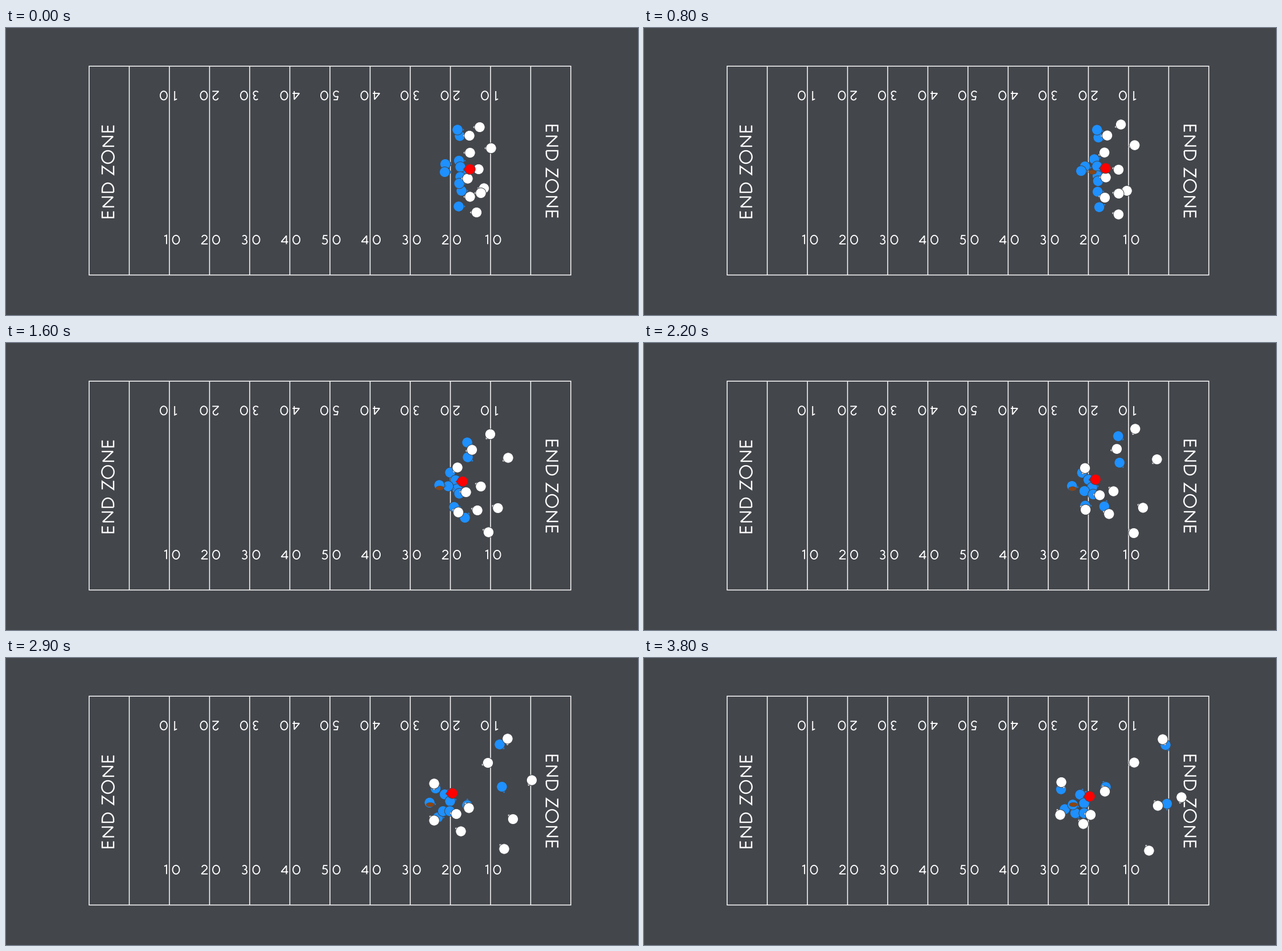
Animation of 1110x505 px, one loop 3.9 s. Source, as a matplotlib script:

```python
import numpy as np
import matplotlib.pyplot as plt
from matplotlib.animation import FuncAnimation
from matplotlib.patches import Circle, Ellipse, Polygon

W, H, DPI = 1110, 505, 100
FRAMES, INTERVAL = 39, 100
END = (FRAMES - 1) * INTERVAL / 1000
PX = 72 / DPI
FIELD, BLUE, WHITE, RED, BROWN = "#43464b", "#1e90ff", "#ffffff", "#ff0000", "#8b4513"
KEYS = np.array([0, 1.6, 2.9, END])

fig = plt.figure(figsize=(W / DPI, H / DPI), dpi=DPI, facecolor=FIELD)
ax = fig.add_axes([0, 0, 1, 1])
ax.set_xlim(0, W)
ax.set_ylim(H, 0)
ax.axis("off")


def arc(cx, cy, rx, ry, start, end):
    a = np.radians(np.linspace(start, end, 40))
    return np.column_stack([cx + rx * np.cos(a), cy + ry * np.sin(a)])


# Thin geometric lettering: strokes with y pointing up.
GLYPHS = {
    "0": [arc(0, 0, 6, 7.6, 0, 360)],
    "1": [[(-2.5, 6), (1.5, 7.8), (1.5, -7.8)]],
    "2": [np.vstack([arc(0, 3.6, 4.4, 4.2, 170, -35), [(-5.3, -7.4), (5.8, -7.4)]])],
    "3": [arc(-.3, 3.9, 3.7, 3.6, 150, -90), arc(-.3, -3.6, 4.5, 4, 90, -150)],
    "4": [[(3, -7.8), (3, 7), (-6, -3.8), (6, -3.8)]],
    "5": [[(4.5, 7.4), (-2, 7.4), (-3.4, 1.2)], arc(-.6, -2.8, 5, 4.9, 125, -145)],
    "E": [[(12, 21), (1, 21), (1, 1), (12, 1)], [(1, 11.3), (11.5, 11.3)]],
    "N": [[(1, 0), (1, 20), (18, 2), (18, 22)]],
    "D": [np.vstack([[(1, 1), (1, 21), (6, 21)], arc(6, 11, 11, 10, 90, -90), [(1, 1)]])],
    "Z": [[(1, 21), (15, 21), (1, 1), (16, 1)]],
    "O": [arc(12, 11, 11, 10.7, 0, 360)],
}
ADVANCE = dict(E=19, N=25.5, D=24, Z=19.5, O=30) | {" ": 7.5}


def draw_line(points, width, z):
    ax.plot(*np.transpose(points), color=WHITE, lw=width * PX, zorder=z, snap=False,
            solid_joinstyle="miter", solid_capstyle="butt")


def draw_glyph(char, origin, right, up, width=1.9):
    for stroke in GLYPHS.get(char, []):
        draw_line(np.array(origin) + np.array(stroke, float) @ np.array([right, up]), width, 3)


def draw_field():
    left, step, top, bottom = 146, 70.5, 67.2, 434.6
    right = left + 12 * step
    for y in (top, bottom):
        draw_line([(left - .7, y), (right + .7, y)], 1.5, 2)
    for i in range(13):
        x = left + i * step
        draw_line([(x, top), (x, bottom)], 1.5, 2)
        if 2 <= i <= 10:
            tens = str(5 - abs(6 - i))
            draw_glyph(tens, (x - (6.5 if tens == "1" else 9), 372.5), (1, 0), (0, -1))
            draw_glyph("0", (x + 11.6, 372.5), (1, 0), (0, -1))
            draw_glyph(tens, (x + 10.7, 118.8), (-1, 0), (0, 1))
            draw_glyph("0", (x - 10, 118.8), (-1, 0), (0, 1))
    s = .5
    for char in "END ZONE":
        draw_glyph(char, (190, 335 - s), (0, -1), (-1, 0), 2.4)
        draw_glyph(char, (948, 170 + s), (0, 1), (1, 0), 2.4)
        s += ADVANCE[char]


def spline(t, points):
    """Smooth path through the points at KEYS, starting from rest."""
    points = np.asarray(points, float)
    slopes = np.gradient(points, KEYS, axis=0)
    slopes[0] = 0
    i = min(np.searchsorted(KEYS, t, side="right") - 1, len(KEYS) - 2)
    h = KEYS[i + 1] - KEYS[i]
    u = (t - KEYS[i]) / h
    return ((1 + 2 * u) * (1 - u) ** 2 * points[i] + u * (1 - u) ** 2 * h * slopes[i]
            + u * u * (3 - 2 * u) * points[i + 1] + u * u * (u - 1) * h * slopes[i + 1])


class Player:
    """Starts facing the other team and turns steadily while running a route."""
    count = 0

    def __init__(self, color, turn, *route):
        self.route, self.turn = route, turn
        self.facing = 0 if color == BLUE else 180
        Player.count += 1
        style = dict(fc=color, ec=FIELD, zorder=(10 if color == BLUE else 50) + Player.count)
        self.nose = ax.add_patch(Polygon([(0, 0)] * 3, lw=.5 * PX, **style))
        self.body = ax.add_patch(Circle((0, 0), 9.2, lw=PX, **style))

    def move(self, t):
        center = spline(t, self.route)
        a = np.radians(self.facing + self.turn * t / END)
        ahead = np.array([np.cos(a), -np.sin(a)])
        side = np.array([np.sin(a), np.cos(a)])
        self.body.center = center
        self.nose.set_xy([center + 12 * ahead, center + 7 * ahead + 5 * side,
                          center + 7 * ahead - 5 * side])


draw_field()

receivers = [
    Player(BLUE, -90, (797, 190), (811, 201), (871, 226.5), (918.5, 256.5)),
    Player(BLUE, -60, (793, 179), (810, 175), (867, 152), (916, 153)),
]
linemen = [
    Player(BLUE, 0, (803, 252), (797, 247), (780, 242), (776, 243)),
    Player(BLUE, 65, (795.5, 233.5), (780, 228), (754.5, 229.5), (732.5, 231)),
    Player(BLUE, 65, (798, 244.5), (789.5, 241.5), (770.5, 240), (766, 240.5)),
    Player(BLUE, 0, (800, 286.5), (787, 288.5), (758.5, 280.5), (739, 266)),
    Player(BLUE, 20, (798, 262), (792.5, 257), (780, 252), (773, 255.5)),
]
runner = Player(BLUE, -55, (771.5, 239.5), (776.5, 252), (767.5, 269.5), (757.5, 273))
ends = [
    Player(BLUE, 0, (796, 273.5), (796, 265), (779.5, 269.5), (773, 273)),
    Player(BLUE, 115, (795, 314), (806, 307.5), (810, 259), (811, 227)),
]
passer = Player(BLUE, -20, (770.5, 253.5), (761, 250), (744, 254.5), (753, 258))
defense = [
    Player(WHITE, 115, (832, 174.5), (850.5, 160.5), (881, 142), (911, 143)),
    Player(WHITE, 25, (814, 189.5), (818.5, 188), (846.5, 184.5), (861, 184)),
    Player(WHITE, 115, (815, 219.5), (793, 219), (752, 221), (733, 218.5)),
    Player(WHITE, 75, (852, 211.5), (882, 202), (923.5, 215), (944, 245)),
    Player(WHITE, -70, (830, 248.5), (834, 252.5), (813, 264), (809.5, 235)),
    Player(WHITE, -10, (811, 265), (808, 262.5), (791, 274.5), (784.5, 276)),
    Player(WHITE, -55, (839.5, 282), (864, 290.5), (890.5, 283.5), (902.5, 260)),
    Player(WHITE, -40, (834, 290.5), (828, 294.5), (799, 305), (771.5, 292)),
    Player(WHITE, -60, (815, 297), (794.5, 298), (752, 286), (731, 276)),
    Player(WHITE, -60, (826.5, 324.5), (847.5, 333), (875, 336), (887, 339)),
    Player(RED, 5, (815, 248.5), (802, 243.5), (784, 238), (783, 243.5)),
]
players = receivers + linemen + [runner] + ends + [passer] + defense
ball = ax.add_patch(Ellipse((0, 0), 14, 7.5, fc=BROWN, ec=FIELD, lw=.5 * PX, zorder=45))


def update(frame):
    t = frame * INTERVAL / 1000
    for player in players:
        player.move(t)
    # The snap flies straight to the passer, who lifts the ball towards the end.
    snap = np.clip((t - .6) / .35, 0, 1)
    held = passer.body.center + np.array([1, 5.5 * (1 - (t / END) ** 4)])
    ball.center = (1 - snap) * np.array([813, 249]) + snap * held
    return []


anim = FuncAnimation(fig, update, frames=FRAMES, interval=INTERVAL, repeat=True,
                     repeat_delay=0, init_func=lambda: update(0))
plt.show()
```
